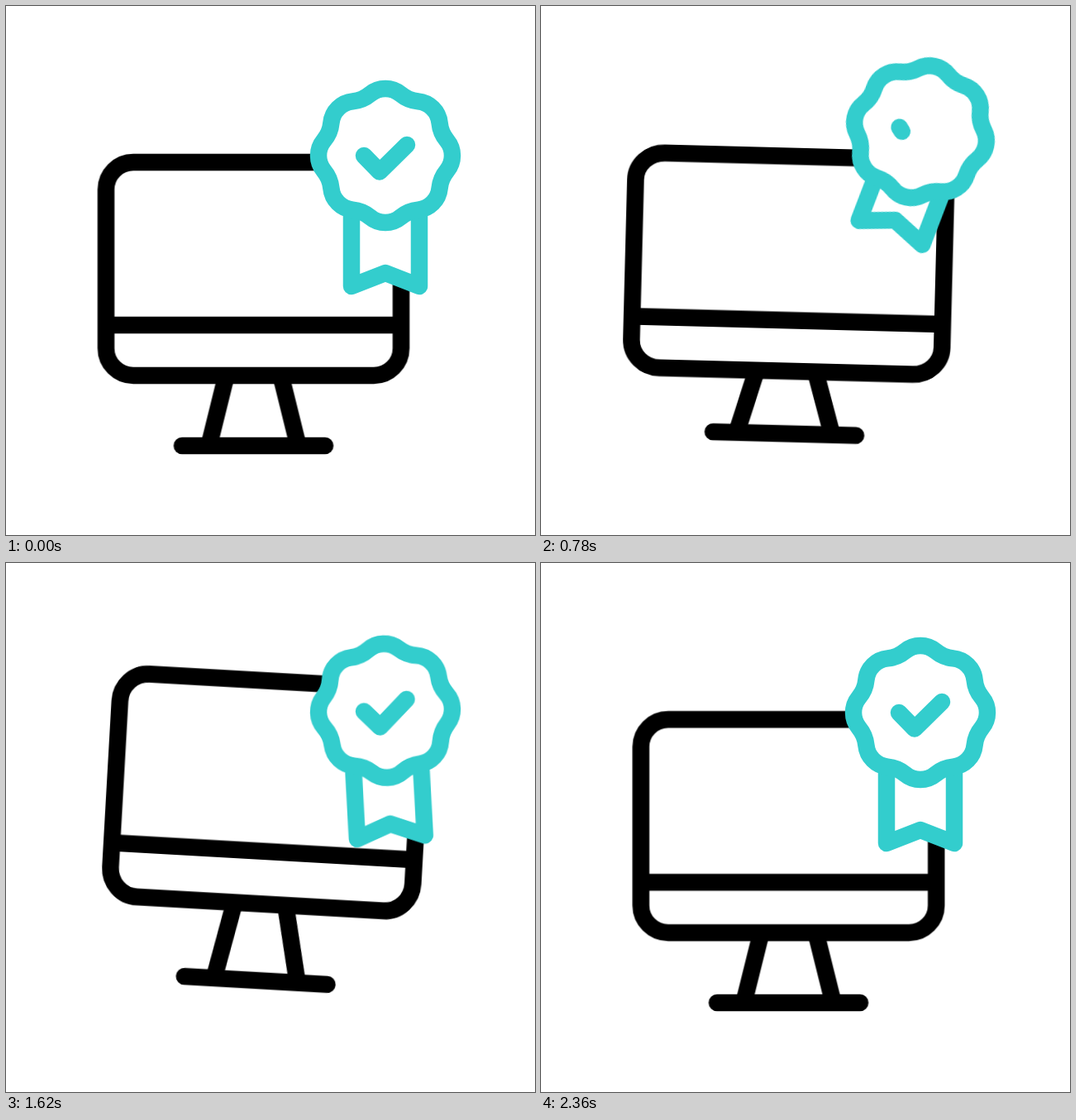
Write an HTML page without scripts that moves like this. It is 640x640 px and loops after 2.4 s.

```html
<!DOCTYPE html>
<html lang="en">
<head>
<meta charset="utf-8">
<title>Certified computer</title>
<style>
  html, body { margin: 0; width: 100%; height: 100%; overflow: hidden; background: #fff; }
  svg { display: block; width: 100%; height: 100%; }

  svg * { vector-effect: non-scaling-stroke; }
  .ink, .teal { fill: none; stroke-width: 20.5; stroke-linejoin: round; }
  .ink { stroke: #000; }
  .teal { stroke: #33cdcd; stroke-linecap: round; }
  .paper { fill: #fff; }

  .body, .screen, .legs, .glare, .badge, .ribbon, .tails, .check {
    animation: 2400ms ease-in-out infinite;
  }

  /* Monitor: crouch, hop with a tilt, land, settle */
  .body { animation-name: drift, hop; }
  .screen { animation-name: squash; }
  .legs { animation-name: bend; }
  .glare { animation-name: sweep; animation-timing-function: linear; }

  @keyframes drift {
    0%, 23.333%, 82.5%, 100% { translate: 299.5px 532px; }
    32.5% { translate: 294.5px 532px; }
    57.5% { translate: 303.5px 532px; }
  }
  @keyframes hop {
    0%, 82.5%, 100% { transform: translateY(0) rotate(0deg); }
    23.333% { transform: translateY(0) rotate(0deg); animation-timing-function: ease-in; }
    32.5% { transform: translateY(-14.5px) rotate(1.46deg); animation-timing-function: ease-out; }
    53.333% { transform: translateY(-51.7px) rotate(6.2deg); }
  }
  @keyframes squash {
    0%, 100% { transform: translateY(-214px) scale(1, 1); }
    23.333% { transform: translateY(-198px) scale(1.055, .982); animation-timing-function: ease-in; }
    32.5% { transform: translateY(-205.6px) scale(1.053, 1.008); animation-timing-function: ease-out; }
    53.333% { transform: translateY(-242px) scale(1.008, 1.072); animation-timing-function: cubic-bezier(.42, 0, .7, .7); }
    77.5% { transform: translateY(-210px) scale(1.049, 1.016); animation-timing-function: ease-out; }
    81.667% { transform: translateY(-200px) scale(1.061, .982); }
  }
  @keyframes bend {
    0%, 100% { transform: scale(1, 1); }
    23.333% { transform: scale(1.14, .835); animation-timing-function: ease-in; }
    32.5% { transform: scale(1.07, .906); animation-timing-function: ease-out; }
    53.333% { transform: scale(.81, 1.24); animation-timing-function: cubic-bezier(.42, 0, .7, .7); }
    77.5% { transform: scale(1.09, .92); animation-timing-function: ease-out; }
    81.667% { transform: scale(1.13, .86); }
  }
  @keyframes sweep {
    0%, 37.4% { transform: translateX(-295px); }
    57%, 100% { transform: translateX(290px); }
  }

  /* Badge: damped bobbing and swinging */
  .badge { --share: .58; animation-name: bob, swing; }
  .ribbon { --share: .42; animation-name: swing; transform-origin: 0 65px; }
  .tails { animation-name: stretch; }
  .check { stroke-dasharray: 100 300; animation-name: tick; }

  @keyframes bob {
    0%, 90%, 100% { translate: 459px 181px; }
    14.167% { translate: 459px 247px; }
    30% { translate: 459px 144px; }
    42.5% { translate: 459px 240px; }
    60% { translate: 459px 160px; }
    75% { translate: 459px 197px; }
  }
  @keyframes swing {
    0%, 90%, 100% { rotate: 0deg; }
    17.5% { rotate: calc(var(--share) * -34deg); }
    34% { rotate: calc(var(--share) * 21.8deg); }
    58% { rotate: calc(var(--share) * -13.6deg); }
    75.833% { rotate: calc(var(--share) * 5.1deg); }
  }
  @keyframes stretch {
    0%, 90%, 100% { translate: 0 0; }
    14.167% { translate: 0 15px; }
    30% { translate: 0 -34px; }
    45% { translate: 0 29px; }
    60% { translate: 0 -21px; }
    75.833% { translate: 0 14px; }
  }
  @keyframes tick {
    0%, 45.8%, 100% { stroke-dashoffset: 0; visibility: visible; }
    16.7%, 29.2% { stroke-dashoffset: 100; visibility: hidden; }
  }
</style>
</head>
<body>
<svg viewBox="0 0 640 640">
  <clipPath id="pane"><rect x="-178.5" y="-129" width="357" height="197"/></clipPath>

  <g class="body ink">
    <path class="legs" d="M-33-85L-54 0M33-85L54 0"/>
    <path d="M-86.5 0H86.5" stroke-linecap="round"/>
    <g class="screen">
      <g clip-path="url(#pane)">
        <path class="glare teal" d="M-93 80L93-140"/>
      </g>
      <rect x="-178.5" y="-129" width="357" height="258" rx="33"/>
      <path d="M-178.5 68H178.5"/>
    </g>
  </g>

  <g class="badge teal">
    <g class="ribbon">
      <path class="tails paper" d="M-41 0V158L0 142L41 158V0"/>
    </g>
    <path class="paper" d="M-18.5-74.3
      A29 29 0 0 1 18.5-74.3 A38.5 38.5 0 0 0 39.5-65.6
      A29 29 0 0 1 65.6-39.5 A38.5 38.5 0 0 0 74.3-18.5
      A29 29 0 0 1 74.3 18.5 A38.5 38.5 0 0 0 65.6 39.5
      A29 29 0 0 1 39.5 65.6 A38.5 38.5 0 0 0 18.5 74.3
      A29 29 0 0 1-18.5 74.3 A38.5 38.5 0 0 0-39.5 65.6
      A29 29 0 0 1-65.6 39.5 A38.5 38.5 0 0 0-74.3 18.5
      A29 29 0 0 1-74.3-18.5 A38.5 38.5 0 0 0-65.6-39.5
      A29 29 0 0 1-39.5-65.6 A38.5 38.5 0 0 0-18.5-74.3Z"/>
    <path class="check" pathLength="100" style="vector-effect:none" d="M-26 0L-7 19.5L26-13"/>
  </g>
</svg>
</body>
</html>
```
